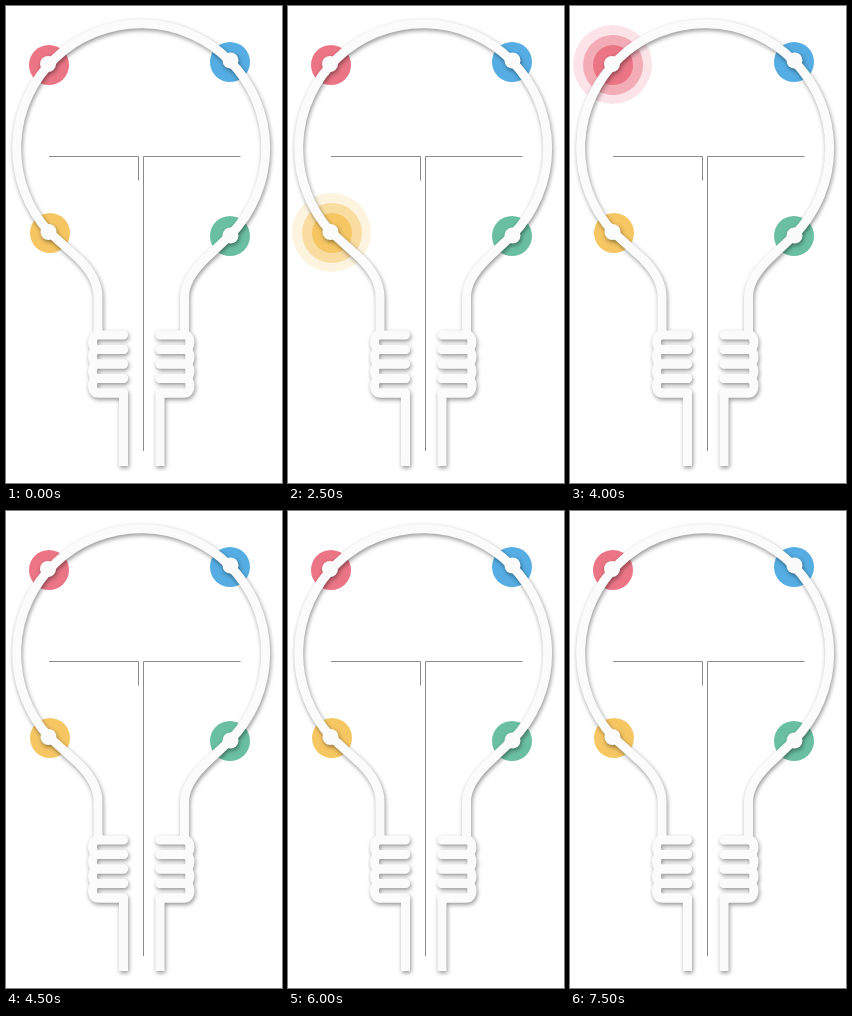
Animation of 276 by 477 pixels, one loop 8000 ms. Source, as an HTML page:

```html
<!DOCTYPE html>
<html lang="en">
<head>
<meta charset="utf-8">
<title>Light bulb</title>
<style>
  html, body { margin: 0; height: 100%; overflow: hidden; background: #fff; }
  svg { display: block; width: 100%; height: 100%; }
  .bulb { fill: none; stroke: #fafbfa; stroke-width: 9; stroke-linejoin: round;
          filter: drop-shadow(1.5px 2px 2px rgba(0, 0, 0, .42)); }
  .round { stroke-linecap: round; }
  .knob { fill: #fafbfa; stroke: none; }
  .wire { fill: none; stroke: #8a8a8a; stroke-width: 1; }
</style>
</head>
<body>
<svg viewBox="0 0 276 477">
  <g id="lights"></g>
  <path class="wire" d="M43 150.5H132.5V174.5M234.5 150.5H137.5V445"/>
  <g class="bulb" id="bulb">
    <path d="M92 328V291C92 277 83 263 73 253L43 226A124.5 124.5 0 1 1 224.5 229L198 254C187 265 178.5 277 178.5 291V328"/>
  </g>
</svg>
<script>
const byId = id => document.getElementById(id);

function add(parent, tag, attrs) {
  const el = document.createElementNS('http://www.w3.org/2000/svg', tag);
  for (const key in attrs) el.setAttribute(key, attrs[key]);
  parent.append(el);
  return el;
}

// Discs, each with two hidden halo rings, and the knobs on the bulb outline.
const lights = [
  { x: 44, y: 227, color: '#f6c663', knob: [42.5, 226] },
  { x: 43, y: 59, color: '#eb7585', knob: [42, 58] },
  { x: 224, y: 56, color: '#55ade3', knob: [224.5, 54.5] },
  { x: 224, y: 230, color: '#6abfa2', knob: [224.5, 229.5] }
];

for (const light of lights) {
  const circle = (r, opacity, shift) => add(byId('lights'), 'circle',
    { cx: light.x - shift, cy: light.y - shift, r, fill: light.color, opacity });
  const outer = circle(39.5, .2, .5);
  const inner = circle(30, .5, 0);
  circle(20, 1, 0);
  light.rings = [inner, outer];
}

// Coil: five bars joined by outer bends, ending in a straight leg.
function coil(near, far, sweep) {
  const pitch = 14.5;
  for (let i = 0; i < 4; i++) {
    add(byId('bulb'), 'path', { class: 'round',
      d: `M${far} ${329 + i * pitch}H${near}a4.5 7.25 0 0 ${sweep} 0 ${pitch}H${far}` });
  }
  add(byId('bulb'), 'path', { d: `M${near} 387H${far}V460` });
}
coil(91, 117.5, 0);
coil(179.5, 154, 1);

for (const { knob: [cx, cy] } of lights) {
  add(byId('bulb'), 'circle', { class: 'knob', cx, cy, r: 8 });
}

const order = [0, 0, 1, 1, 2];  // which light pulses in each 1.5 s turn

function draw(now) {
  const step = Math.floor(now % 8000 / 500);
  const active = order[Math.floor(step / 3)];
  const count = step % 3;
  lights.forEach((light, i) => light.rings.forEach((ring, n) => {
    ring.style.display = i === active && n < count ? '' : 'none';
  }));
}

let start;
function tick(now) {
  start ??= now;
  draw(now - start);
  requestAnimationFrame(tick);
}
draw(0);
requestAnimationFrame(tick);
</script>
</body>
</html>
```
